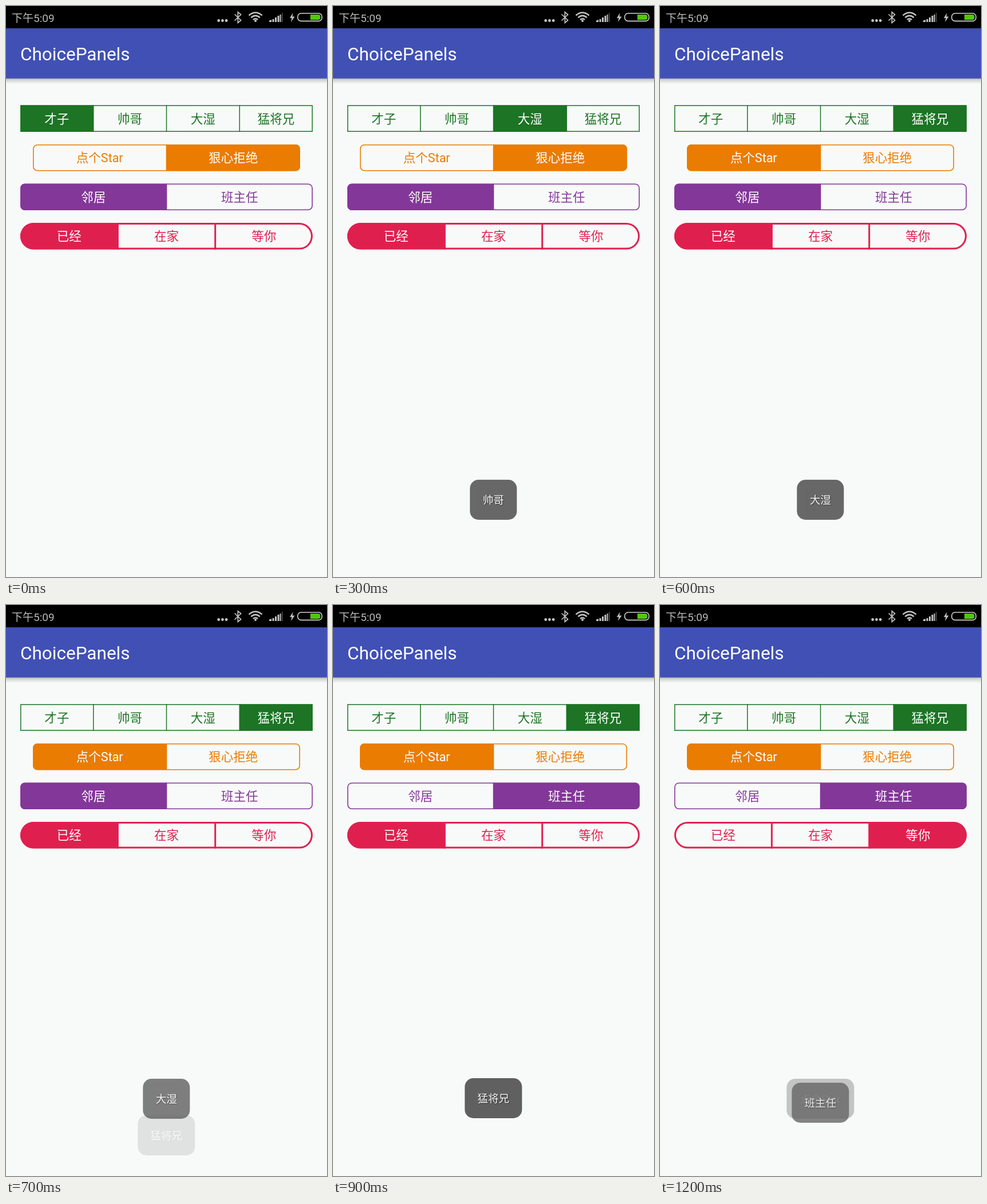
Write an HTML page that moves like this. It is 561 px wide and 998 px high and loops after 1300 ms.

```html
<!DOCTYPE html>
<html lang="zh-CN">
<head>
<meta charset="utf-8">
<style>
  html, body { margin: 0; width: 100%; height: 100%; overflow: hidden; background: #f8faf9; }
  svg { display: block; width: 561px; height: 998px; font-family: Roboto, "Noto Sans CJK SC", "Noto Sans CJK", sans-serif; }
  .label { font-size: 21.5px; text-anchor: middle; }
  .toast text { font-size: 18.6px; fill: #f4f4f4; text-anchor: middle; text-shadow: 1px 1px 2px #0008; }
</style>
</head>
<body>
<svg viewBox="0 0 561 998">
  <defs>
    <linearGradient id="shade" x2="0" y2="1">
      <stop stop-color="#000" stop-opacity=".4"/>
      <stop offset=".25" stop-color="#000" stop-opacity=".17"/>
      <stop offset="1" stop-color="#000" stop-opacity="0"/>
    </linearGradient>
  </defs>
  <rect width="561" height="998" fill="#f8faf9"/>
  <rect y="126" width="561" height="10" fill="url(#shade)"/>
  <rect y="39" width="561" height="87.5" fill="#4050b5"/>
  <rect width="561" height="39" fill="#000"/>
  <text x="25" y="95" font-size="31.5" fill="#fff">ChoicePanels</text>

  <g fill="#c4c4c4">
    <text x="10" y="27.5" font-size="19" fill="#b8b8b8">下午5:09</text>
    <circle cx="371.7" cy="25.5" r="2.4"/>
    <circle cx="378.4" cy="25.5" r="2.4"/>
    <circle cx="385.1" cy="25.5" r="2.4"/>
    <path d="M399.5 14.5 410.5 25 405.3 29.5V10.5L410.5 15 399.5 25.5" fill="none" stroke="#c4c4c4" stroke-width="1.7"/>
    <g fill="none" stroke="#c4c4c4" stroke-width="2.6">
      <path d="M424.5 16.5Q436 6.5 447.5 16.5"/>
      <path d="M428.3 20.3Q436 13.5 443.7 20.3"/>
      <path d="M432 24Q436 20.5 440 24"/>
    </g>
    <circle cx="436" cy="26" r="2"/>
    <path d="M460 28v-2.5l4-1.5v4zM465.5 28v-5h3v5zM470 28v-8h3v8zM474.5 28v-11h3v11z"/>
    <path d="M478.6 28V15h2v13z"/>
    <path d="M481.8 28V12h2v16z" fill="#444"/>
    <path d="M501.5 12 496 21h3.5l-1.5 7 6.5-9.5h-4z"/>
    <rect x="509.8" y="12.8" width="42.4" height="13.6" rx="6" fill="none" stroke="#d0d0d0" stroke-width="1.6"/>
    <path d="M532 15h14q3.5 0 3.5 4.6t-3.5 4.6h-14z" fill="#50c80c"/>
  </g>
  <g id="rows"></g>
  <g id="toasts"></g>
</svg>
<script>
const STEP = 100, STEPS = 13, HEIGHT = 46.6, PAPER = '#f8faf9';

const rows = [
  { x: 25, y: 173.3, w: 511, r: 0, line: 1.5, color: '#1c7424', labels: ['才子', '帅哥', '大湿', '猛将兄'] },
  { x: 47, y: 241.9, w: 467, r: 8, line: 1.6, color: '#ea7c02', labels: ['点个Star', '狠心拒绝'] },
  { x: 25, y: 310.4, w: 511, r: 8, line: 1.6, color: '#833799', labels: ['邻居', '班主任'] },
  { x: 25, y: 379, w: 511, r: 23.3, line: 3, color: '#df204f', labels: ['已经', '在家', '等你'] }
];
const initial = [0, 1, 0, 0];

// Taps: step, row, cell
const taps = [[1, 0, 1], [3, 0, 2], [5, 0, 3], [6, 1, 0], [8, 2, 1], [10, 3, 2]];

// Toasts: text, width, then poses by step as [vertical offset, opacity]
const toasts = [
  ['帅哥', 82, { 1: [22.5, .6], 2: [0, .95], 3: [0, .95] }],
  ['大湿', 82, { 4: [0, .95], 5: [0, .95], 6: [0, .95], 7: [0, .8] }],
  ['猛将兄', 100, { 7: [64, .15], 8: [-1, 1], 9: [-1, 1], 10: [0, .04] }],
  ['点个Star', 118, { 10: [-15, 1], 11: [0, 1], 12: [0, .34] }],
  ['班主任', 100, { 12: [7, .76] }]
];

function drawRow({ x, y, w, r, line, color, labels }, selected, id) {
  const cell = w / labels.length, half = line / 2;
  let lines = '', texts = '';
  labels.forEach((label, i) => {
    const left = x + i * cell;
    if (i) lines += `<path d="M${left} ${y}v${HEIGHT}"/>`;
    texts += `<text class="label" x="${left + cell / 2}" y="${y + 31.3}" fill="${i === selected ? '#fff' : color}">${label}</text>`;
  });
  return `<clipPath id="clip${id}"><rect x="${x}" y="${y}" width="${w}" height="${HEIGHT}" rx="${r}"/></clipPath>
    <rect x="${x + selected * cell}" y="${y}" width="${cell}" height="${HEIGHT}" fill="${color}" clip-path="url(#clip${id})"/>
    <g fill="none" stroke="${color}" stroke-width="${line}">${lines}
      <rect x="${x + half}" y="${y + half}" width="${w - line}" height="${HEIGHT - line}" rx="${Math.max(0, r - half)}"/>
    </g>${texts}`;
}

function drawToast([text, w, poses], step) {
  if (!poses[step]) return '';
  const [dy, opacity] = poses[step];
  return `<g class="toast" transform="translate(280.3 ${828 + dy})" opacity="${opacity}">
    <rect x="${-w / 2}" width="${w}" height="70" rx="15" fill="#606060"/>
    <text y="42">${text}</text></g>`;
}

function draw(step) {
  const selected = [...initial];
  for (const [at, row, cell] of taps) if (step >= at) selected[row] = cell;
  document.getElementById('rows').innerHTML = rows.map((row, i) => drawRow(row, selected[i], i)).join('');
  document.getElementById('toasts').innerHTML = toasts.map(toast => drawToast(toast, step)).join('');
}

const start = performance.now();
let shown = -1;
function tick() {
  const step = Math.floor((performance.now() - start) / STEP) % STEPS;
  if (step !== shown) draw(shown = step);
  requestAnimationFrame(tick);
}
tick();
</script>
</body>
</html>
```
